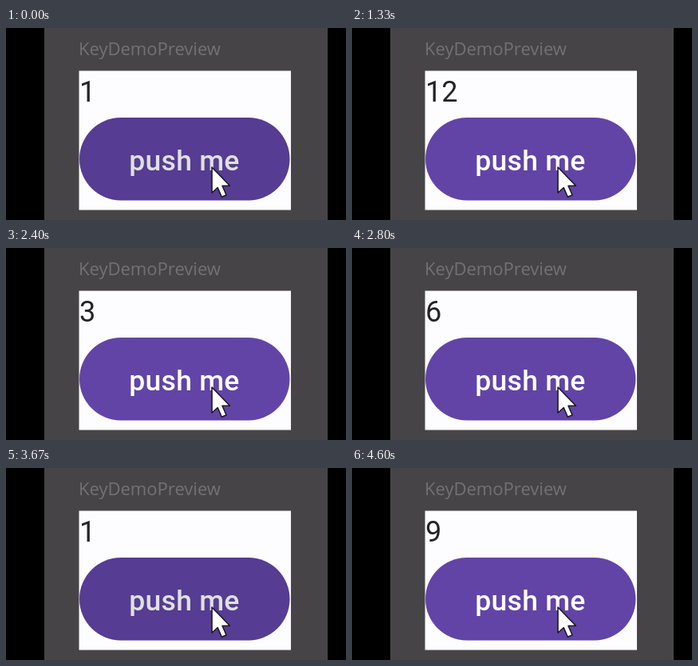
An HTML page for the animation above (4.67 s loop, 426x240 px).

```html
<!DOCTYPE html>
<html lang="en">
<head>
<meta charset="utf-8">
<title>Key demo</title>
<style>
  html, body { margin: 0; width: 100%; height: 100%; overflow: hidden; background: #000; }
  svg { display: block; width: 426px; height: 240px; }
  .title { font: 22px "Open Sans", sans-serif; fill: #737172; }
  .count { font: 36px Roboto, sans-serif; fill: #242226; }
  .label { font: 500 35.5px Roboto, sans-serif; letter-spacing: .26px; fill: #fff; }
</style>
</head>
<body>
<svg viewBox="0 0 426 240">
  <rect x="48" width="355" height="240" fill="#464447"/>
  <text class="title" x="91" y="34">KeyDemoPreview</text>
  <rect x="91.5" y="53.5" width="265.5" height="174" fill="#fdfcfe"/>
  <text class="count" id="count" x="92" y="92">1</text>
  <rect x="92" y="112" width="263.5" height="103.5" rx="51.75" fill="#6244a7"/>
  <text class="label" x="223.5" y="178" text-anchor="middle">push me</text>
  <rect id="press" x="92" y="112" width="263.5" height="103.5" rx="51.75" fill="#000" opacity="0"/>
  <path d="M258 174V206L265.2 199.5L270.3 211.3L276 208.8L271 197.3H280.5Z"
        fill="#fff" stroke="#1c1822" stroke-width="1.6" stroke-linejoin="round"/>
</svg>
<script>
  const LOOP = 4670, FRAME = 1000 / 15, TICK = 117;
  const clicks = [-150, 1985, 3490];
  const count = document.getElementById('count');
  const press = document.getElementById('press');
  const clamp = v => Math.max(0, Math.min(1, v));

  // The press shade comes in just before the click and fades after it.
  const shade = age => 0.12 * Math.min(clamp((age + 110) / 70), clamp((350 - age) / 130));

  function draw(now) {
    const time = now % LOOP;
    const t = Math.floor(time / FRAME + 0.1) * FRAME;
    const start = clicks.filter(c => c <= t).pop();
    count.textContent = Math.floor((t - start) / TICK);
    press.setAttribute('opacity', Math.max(...clicks.map(c => shade(t - c))));
  }

  const origin = performance.now();
  function loop() {
    draw(performance.now() - origin);
    requestAnimationFrame(loop);
  }
  loop();
</script>
</body>
</html>
```
